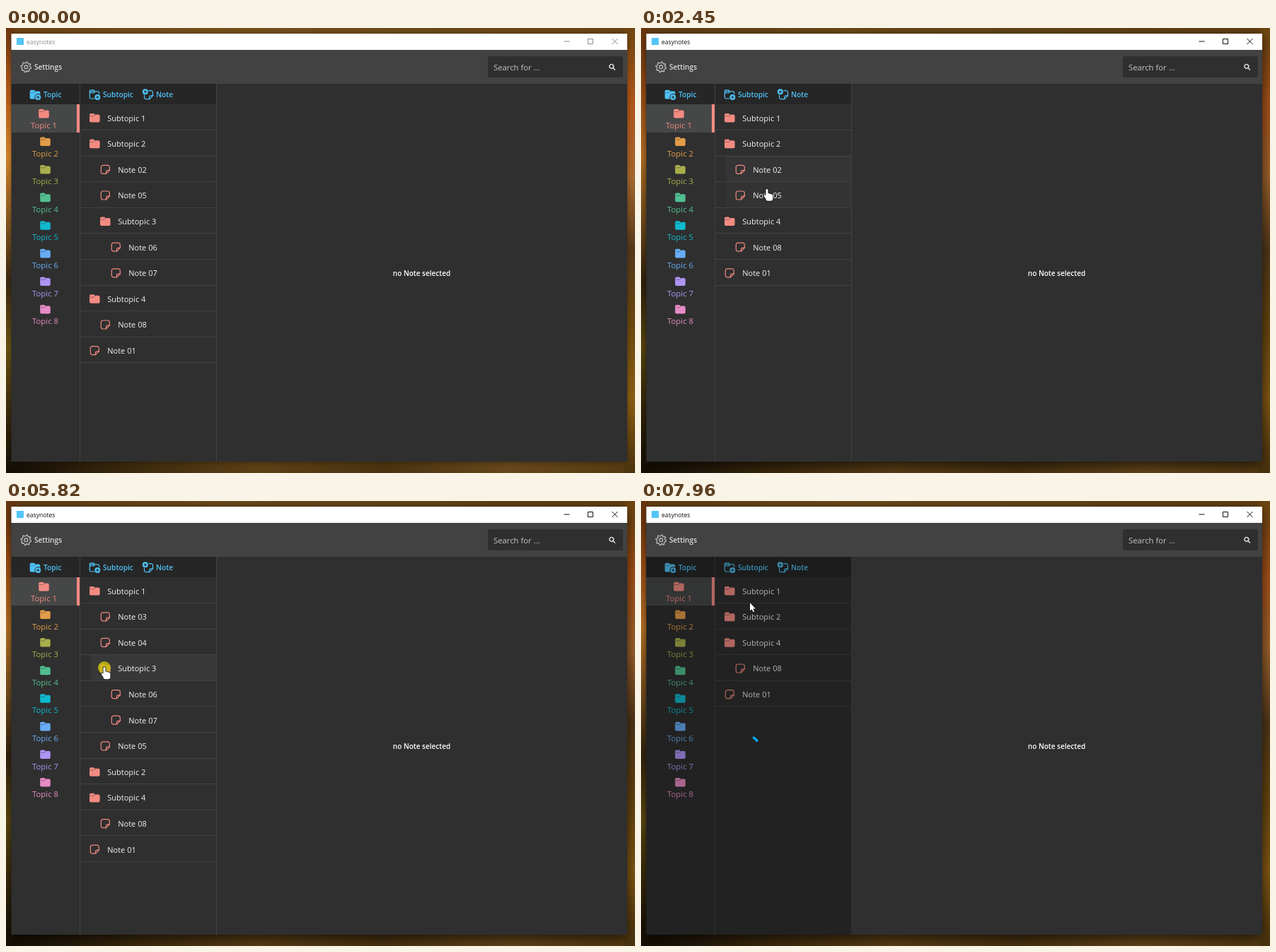
An HTML page with a canvas that plays this animation: 889 px wide and 630 px high, repeating every 8 s.

```html
<!DOCTYPE html>
<html lang="en">
<head>
<meta charset="utf-8">
<title>easynotes</title>
<style>
html, body { margin: 0; width: 100%; height: 100%; overflow: hidden; background: #1a1207; }
canvas { display: block; width: 889px; height: 630px; }
</style>
</head>
<body>
<canvas id="stage" width="889" height="630"></canvas>
<script>
const ctx = document.getElementById('stage').getContext('2d');
const LOOP = 8000;
const FONT = '"Open Sans", "Noto Sans", sans-serif';
const BG = '#2f2f2f', HEAD = '#262626', LINE = '#424242', BLUE = '#4fc3f7', SALMON = '#f28b82';
const TOPICS = [SALMON, '#e39c48', '#a9af4c', '#52bf90', '#0fb9cf', '#68adf5', '#ae94f3', '#e68bc4'];
const LEFT = 7.5, TOP = 108, ROW = 36.6;

// Pointer moves: start, end, and the spot reached
const START = { x: 575, y: -60 };
const MOVES = [
  [40, 620, 128, 250], [620, 840, 172, 271], [1000, 1680, 176, 132], [2180, 2460, 178, 229],
  [2650, 3300, 179.5, 129.5], [3400, 3640, 185, 170], [3800, 3840, 186.5, 172], [4230, 4430, 186, 135],
  [4780, 5290, 139, 236], [6080, 6580, 170, 138], [7180, 7480, 154, 144]
];
const DRAGS = [
  { from: 940, to: 1750, reload: 2120, name: 'Subtopic 3', row: 4 },
  { from: 2590, to: 3335, reload: 3500, name: 'Note 05', row: 3 }
];
const CLICKS = [4090, 4450, 5820, 6790];
const LOADS = [...DRAGS.map(d => [d.to, d.reload]), [7650, LOOP]];
const PRESS = 120, REACT = 180, FADE = 130;

const clamp = v => Math.max(0, Math.min(1, v));
const ease = k => k * k * (3 - 2 * k);
const clicked = (t, i) => t >= CLICKS[i] + REACT;

function pointer(t) {
  let { x, y } = START;
  for (const [from, to, toX, toY] of MOVES) {
    const k = ease(clamp((t - from) / (to - from)));
    x += (toX - x) * k;
    y += (toY - y) * k;
  }
  return { x, y };
}

function listRows(t) {
  const rows = [];
  const add = (depth, ...names) => names.forEach(name => rows.push({ depth, name }));
  const [first, second] = DRAGS;
  add(0, 'Subtopic 1');
  if (clicked(t, 1) && !clicked(t, 3)) {
    add(1, 'Note 03', 'Note 04', 'Subtopic 3');
    if (!clicked(t, 2)) add(2, 'Note 06', 'Note 07');
    add(1, 'Note 05');
  }
  add(0, 'Subtopic 2');
  if (!clicked(t, 0)) add(1, 'Note 02');
  if (t < second.reload) add(1, 'Note 05');
  if (t < first.reload) {
    add(1, 'Subtopic 3');
    add(2, 'Note 06', 'Note 07');
  }
  add(0, 'Subtopic 4');
  add(1, 'Note 08');
  add(0, 'Note 01');
  return rows;
}

function rect(x, y, w, h, color) {
  ctx.fillStyle = color;
  ctx.fillRect(x, y, w, h);
}

function round(x, y, w, h, r, color) {
  ctx.beginPath();
  ctx.roundRect(x, y, w, h, r);
  ctx.fillStyle = color;
  ctx.fill();
}

function disc(x, y, r, color) {
  ctx.beginPath();
  ctx.arc(x, y, r, 0, 7);
  ctx.fillStyle = color;
  ctx.fill();
}

function text(str, x, y, size, color, weight = 400, align = 'left') {
  ctx.font = `${weight} ${size}px ${FONT}`;
  ctx.textAlign = align;
  ctx.fillStyle = color;
  ctx.fillText(str, x, y);
}

function trace(points, close) {
  ctx.beginPath();
  points.forEach(([x, y]) => ctx.lineTo(x, y));
  if (close) ctx.closePath();
}

function stroke(color, width) {
  ctx.strokeStyle = color;
  ctx.lineWidth = width;
  ctx.stroke();
}

function at(x, y, draw) {
  ctx.save();
  ctx.translate(x, y);
  draw();
  ctx.restore();
}

function folder(x, y, color) {
  at(x, y, () => {
    round(-7.3, -6.2, 7.4, 6, 2, color);
    round(-7.3, -4.6, 14.6, 11, 2, color);
    trace([[-7, -2.4], [-1, -2.4], [1, -4.4]]);
    stroke('rgba(47,47,47,.55)', 0.8);
  });
}

function folderOutline(x, y, color) {
  at(x, y, () => {
    ctx.beginPath();
    ctx.roundRect(-6.7, -4.2, 13.4, 10.2, 2);
    ctx.roundRect(-6.7, -6.2, 6.6, 4.2, 1.5);
    stroke(color, 1.2);
  });
}

function note(x, y, color) {
  at(x, y, () => {
    ctx.beginPath();
    ctx.moveTo(6, 1.2);
    ctx.arcTo(6, -6, -6, -6, 2.6);
    ctx.arcTo(-6, -6, -6, 6, 2.6);
    ctx.arcTo(-6, 6, 1.2, 6, 2.6);
    ctx.lineTo(1.2, 6);
    ctx.arcTo(1.2, 1.2, 6, 1.2, 1.8);
    ctx.lineTo(6, 1.2);
    ctx.lineTo(1.2, 6);
    stroke(color, 1.2);
  });
}

function plus(x, y) {
  disc(x, y, 4.9, HEAD);
  disc(x, y, 4, BLUE);
  rect(x - 2.2, y - 0.5, 4.4, 1, HEAD);
  rect(x - 0.5, y - 2.2, 1, 4.4, HEAD);
}

function gear(x, y) {
  const rim = Array.from({ length: 32 }, (_, i) => {
    const a = (i + 0.5) / 16 * Math.PI, r = i % 4 < 2 ? 7.3 : 5.6;
    return [x + r * Math.cos(a), y + r * Math.sin(a)];
  });
  trace(rim, true);
  stroke('#cfcfcf', 1.1);
  ctx.beginPath();
  ctx.arc(x, y, 2.4, 0, 7);
  stroke('#cfcfcf', 1.1);
}

// Evenly spaced colours
function gradient(x, y, w, h, colors) {
  const g = w > h ? ctx.createLinearGradient(x, 0, x + w, 0) : ctx.createLinearGradient(0, y, 0, y + h);
  colors.forEach((c, i) => g.addColorStop(i / (colors.length - 1), c));
  rect(x, y, w, h, g);
}

function desktop() {
  gradient(0, 0, 889, 20, ['#6a4213', '#75501b', '#6b4a18', '#6a4313']);
  gradient(0, 610, 889, 20, ['#120d05', '#3c290d', '#5d4015', '#4a330f', '#66471a', '#543a10']);
  gradient(0, 0, 12, 630, ['#6b370f', '#b45a18', '#d4842a', '#8a5a20', '#3a2810', '#6a5212', '#3c2c0b', '#120d05']);
  gradient(874, 0, 15, 630, ['#6e4710', '#b0551a', '#a5672e', '#55391a', '#6b480f', '#8a5d14', '#4a330d']);
}

function frameWindow(active) {
  ctx.save();
  ctx.shadowColor = `rgba(0,0,0,${active ? 0.75 : 0.35})`;
  ctx.shadowBlur = active ? 20 : 8;
  ctx.shadowOffsetY = active ? 4 : 1;
  rect(LEFT, 8, 870.5, 606, BG);
  ctx.restore();

  const ink = active ? '#111' : '#8b8b8b';
  rect(LEFT, 8, 870.5, 23, '#fff');
  rect(15, 14, 10, 10, '#54c5f8');
  text('easynotes', 29, 22.5, 8.6, ink);
  rect(788.5, 18.5, 8, 1, ink);
  ctx.beginPath();
  ctx.rect(822.5, 15.5, 7, 7);
  ctx.moveTo(856.5, 15);
  ctx.lineTo(864.5, 23);
  ctx.moveTo(864.5, 15);
  ctx.lineTo(856.5, 23);
  stroke(ink, 1);

  rect(LEFT, 31, 870.5, 48, '#424242');
  gear(28.3, 55.3);
  text('Settings', 40, 59.2, 10.1, '#dedede', 600);
  round(681, 40, 191, 30, 3, BG);
  text('Search for ...', 689, 59.7, 11.3, '#c6c6c6');
  ctx.beginPath();
  ctx.arc(855.8, 54.3, 2.9, 0.8, 7.07);
  ctx.lineTo(861, 59.5);
  stroke('#e8e8e8', 1.4);
  text('no Note selected', 587.5, 350.7, 10, '#fff', 600, 'center');
}

function topics() {
  rect(LEFT, 79, 290, 29, HEAD);
  const label = (str, x) => text(str, x, 98, 10.2, BLUE, 600);
  folder(41, 94, BLUE);
  plus(45.3, 98);
  label('Topic', 53);
  folderOutline(125, 94, BLUE);
  plus(129.3, 98);
  label('Subtopic', 137);
  note(201.5, 94.6, BLUE);
  plus(196.8, 90.3);
  label('Note', 212);

  rect(LEFT, TOP, 96.5, 40, '#464747');
  rect(100, TOP, 4, 40, SALMON);
  TOPICS.forEach((color, i) => {
    const x = i ? 55.5 : 53.5, y = 121 + i * 39.6;
    folder(x, y, color);
    text(`Topic ${i + 1}`, x, y + 21, 11.3, color, 400, 'center');
  });
}

function item(name, x, y) {
  (name.startsWith('Sub') ? folder : note)(x, y, SALMON);
  text(name, x + 18, y + 4.4, 11, '#f4f4f4');
}

const rowY = i => TOP + i * ROW;
const overList = (p, count) => p.x > 104 && p.x < 298 && p.y >= TOP && p.y < rowY(count);

function list(t, loading) {
  const rows = listRows(t);
  const glow = rows.map(() => 0);
  for (let k = 0; k < 5 && !loading; k++) {
    const p = pointer(t - k * 30);
    if (overList(p, rows.length)) glow[Math.floor((p.y - TOP) / ROW)] += 0.2;
  }
  rows.forEach(({ depth, name }, i) => {
    const indent = depth * 15;
    rect(105 + indent, rowY(i), 193 - indent, ROW, `rgba(255,255,255,${0.045 * glow[i]})`);
    rect(105, Math.round(rowY(i + 1) - 0.6), 193, 1, LINE);
    item(name, 125.3 + indent, rowY(i) + 19.2);
  });
  rect(104, 79, 1, 535, LINE);
  rect(297, 79, 1, 535, LINE);
  return rows.length;
}

function drag(t, p) {
  const d = DRAGS.find(d => t >= d.from + 60 && t < d.to);
  if (!d) return;
  const grab = pointer(d.from);
  const dx = p.x - grab.x, y = rowY(d.row) + 19.2 + p.y - grab.y;
  rect(105 + dx, y - 19, 193.5 - dx, 37.5, '#2e2f2f');
  item(d.name, 125.3 + dx, y);
}

function loader(t, [from, to]) {
  const k = Math.min(clamp((t - from) / FADE), 1 - clamp((t - to) / FADE));
  rect(LEFT, 79, 290.5, 535, `rgba(0,0,0,${0.27 * k})`);
  if (t >= to) return;
  const age = (t - from) / 1000, start = age * 1.3 - Math.PI / 2;
  ctx.beginPath();
  ctx.arc(153, 346.5, 13, start, start + age * 2.2);
  stroke('#03a9f4', 3.4);
}

function handShape() {
  ctx.beginPath();
  ctx.roundRect(-1.5, -1, 3, 12, 1.5);
  for (let i = 0; i < 3; i++) ctx.roundRect(1.2 + i * 2.3, 5.2 + i * 0.8, 2.6, 7, 1.3);
  ctx.roundRect(-1.6, 8, 10, 8.2, 3);
  ctx.ellipse(-1.8, 10.6, 1.5, 3.4, -0.6, 0, 7);
}

function arrowShape() {
  trace([[0, 0], [0, 11.6], [2.7, 9.2], [4.5, 13.2], [6.2, 12.4], [4.5, 8.6], [8, 8.5]], true);
}

function cursor(p, hand, pressed) {
  if (pressed) disc(p.x, p.y, 9, 'rgba(200,190,12,.85)');
  at(p.x, p.y, () => {
    ctx.lineJoin = 'round';
    (hand ? handShape : arrowShape)();
    stroke('#111', 1.6);
    ctx.fillStyle = '#fff';
    ctx.fill();
  });
}

function render(t) {
  const p = pointer(t);
  const load = LOADS.find(([from, to]) => t >= from && t < to + FADE);
  const loading = !!load && t < load[1];
  const pressed = DRAGS.some(d => t >= d.from && t < d.to) || CLICKS.some(c => t >= c && t < c + PRESS);
  desktop();
  frameWindow(t >= DRAGS[0].from);
  topics();
  const count = list(t, loading);
  if (load) loader(t, load);
  drag(t, p);
  cursor(p, !loading && overList(p, count), pressed);
}

let begin;
function tick(now) {
  begin ??= now;
  render((now - begin) % LOOP);
  requestAnimationFrame(tick);
}
render(0);
requestAnimationFrame(tick);
</script>
</body>
</html>
```
